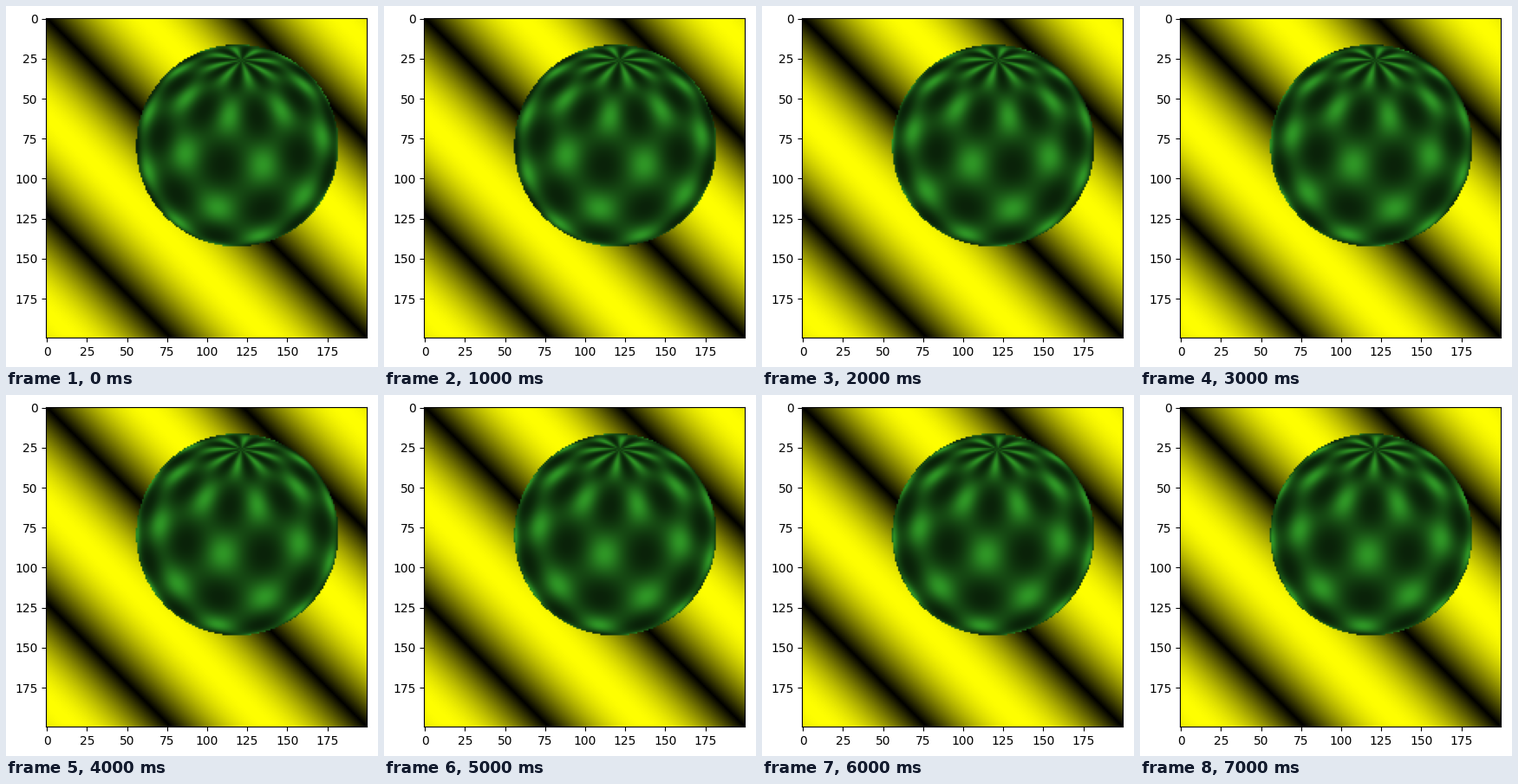
A matplotlib script for the animation above (8 s loop, 429 by 417 pixels).

```python
import numpy as np
import matplotlib.pyplot as plt
from matplotlib.animation import FuncAnimation

W, H, DPI = 429, 417, 100
N = 200                      # image resolution
FOCAL = 274.5                # focal length in image pixels
PITCH = np.radians(46.4)     # camera looks down at the ball
DIST = 4.5                   # camera distance in ball radii
LOBES = 8
STRIPE = 122.2               # distance between dark stripes
DARK = np.array([10, 34, 9]) / 255
BRIGHT = np.array([47, 150, 38]) / 255


def ray(x, y):
    """Unit world direction through a point given from the image centre, y up."""
    c, s = np.cos(PITCH), np.sin(PITCH)
    d = np.stack([x, y * c - FOCAL * s, y * s + FOCAL * c], axis=-1)
    return d / np.linalg.norm(d, axis=-1, keepdims=True)


def background():
    row, col = np.mgrid[:N, :N]
    level = np.abs(np.sin(np.pi * (col - row) / STRIPE))
    return np.stack([level, level, np.zeros_like(level)], axis=-1)


def ball_angles():
    """Mask of the ball, with polar angle and azimuth at each hit point."""
    row, col = np.mgrid[:N, :N] + 0.5
    rays = ray(col - N / 2, N / 2 - row)
    aim = ray(np.float64(18.4), np.float64(18.9))
    centre = DIST * aim
    along = rays @ centre
    disc = along ** 2 - DIST ** 2 + 1
    hit = disc > 0
    depth = along[hit] - np.sqrt(disc[hit])
    normal = rays[hit] * depth[:, None] - centre
    theta = np.arccos(np.clip(normal[:, 1], -1, 1))
    ax, _, az = aim
    side = normal[:, 0] * az - normal[:, 2] * ax
    front = -normal[:, 0] * ax - normal[:, 2] * az
    return hit, theta, np.arctan2(side, front)


SKY = background()
HIT, THETA, PHI = ball_angles()


def render(frame):
    # The spin restarts after 60 steps of two degrees.
    step = (58 + frame) % 60
    turn = np.radians(-10.4 + 2 * step)
    wave = np.sin(LOBES * THETA) * np.cos(LOBES * (PHI - turn))
    mix = (0.5 + 0.5 * wave)[:, None]
    img = SKY.copy()
    img[HIT] = DARK * (BRIGHT / DARK) ** mix
    return img


fig = plt.figure(figsize=(W / DPI, H / DPI), dpi=DPI)
side = 369.6
ax = fig.add_axes([46.2 / W, 33.7 / H, side / W, side / H])
picture = ax.imshow(render(0))
ax.set_xticks(range(0, N, 25))
ax.set_yticks(range(0, N, 25))


def update(frame):
    picture.set_data(render(frame))
    return [picture]


anim = FuncAnimation(fig, update, frames=8, interval=1000, repeat=True)
plt.show()
```
